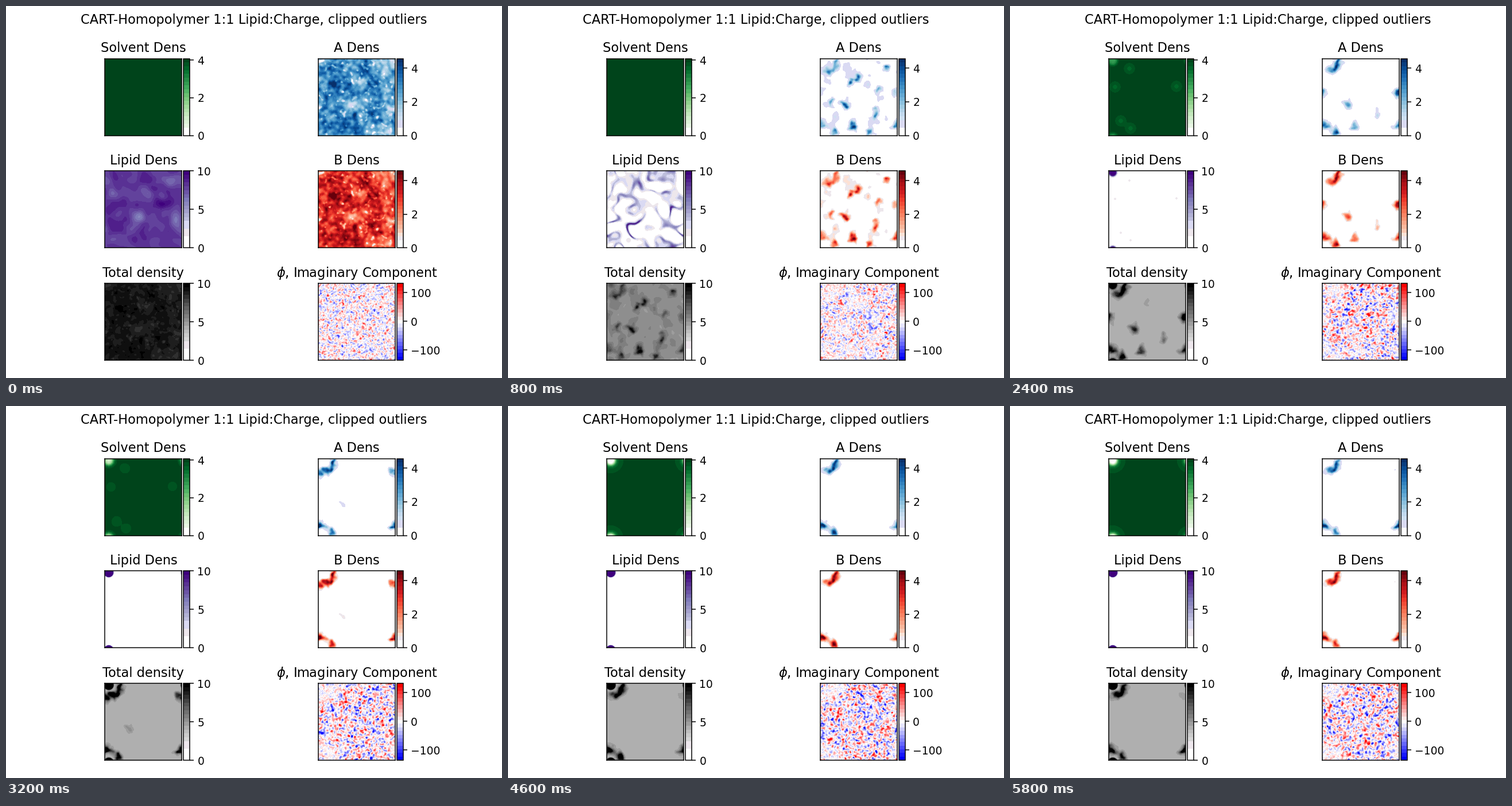
Recreate the animation shown at these times as a matplotlib script. Size 864 px wide and 648 px high, loop 6000 ms.

```python
import matplotlib.pyplot as plt
import numpy as np
from matplotlib.animation import FuncAnimation
from matplotlib.colors import ListedColormap

W, H, DPI = 864, 648, 135
SIZE = 134
FRAMES, INTERVAL = 30, 200

Y, X = np.mgrid[0:SIZE, 0:SIZE] + 0.5
FREQ = np.fft.fftfreq(SIZE)
FREQ2 = FREQ[:, None] ** 2 + FREQ[None, :] ** 2


def smooth(field, sigma):
    return np.fft.ifft2(np.fft.fft2(field) * np.exp(-2 * np.pi**2 * sigma**2 * FREQ2)).real


def noise(seed, sigma):
    """Periodic Gaussian noise with unit spread."""
    out = smooth(np.random.default_rng(seed).normal(size=(SIZE, SIZE)), sigma)
    return (out - out.mean()) / out.std()


def ramp(n, start, end):
    return np.clip((n - start) / (end - start), 0, 1)


def dist(x, y, warp=(0, 0)):
    """Distance to a point in the periodic box, optionally on a warped grid."""
    half = SIZE / 2
    dx = (X + warp[0] - x + half) % SIZE - half
    dy = (Y + warp[1] - y + half) % SIZE - half
    return np.hypot(dx, dy)


def blob(x, y, r, warp=(0, 0)):
    return np.exp(-((dist(x, y, warp) / r) ** 2))


def disk(x, y, r, soft):
    return 1 / (1 + np.exp(np.clip((dist(x, y) - r) / soft, -50, 50)))


CORE = (7, 4)
RING = 20.5
LOBES = np.radians([15, 45, 75, -38, -92, -117])
# Longest lived first
DROPS = [(42, 80), (59, 115), (95, 98), (66, 32), (53, 41), (117, 18), (84, 129), (103, 53), (18, 74)]
LIPID_SPOTS = [(21, 108), (11, 50), (118, 49), (38, 121), (36, 18)]
HOLES = [(14, 40), (74, 41), (116, 20), (124, 90), (60, 80)]

holes = sum(blob(x, y, 11) for x, y in HOLES)
specks = np.maximum(noise(3, 1.8) - 0.9, 0)
MIX = np.clip(2.95 + 0.45 * noise(1, 2.2) + 0.4 * noise(2, 6) - 1.3 * holes - 1.2 * specks, 0.4, 4.4)
LIPID_MIX = 8.2 + 0.35 * noise(4, 6) - 1.9 * holes + 1.1 * blob(100, 62, 10)
NETWORK = 0.9 + 5.5 * np.exp(-((noise(5, 7) / 0.5) ** 2)) * np.clip(0.65 + 0.35 * noise(8, 5), 0.1, 1.5)
SPOTS = sum(blob(x, y, 7.5) for x, y in LIPID_SPOTS)


def polymer(n, mix):
    """Polymer density: a dense mix that breaks into drops and a ring round the core."""
    warp = [2.4 * noise(30 + k, 4) + 0.8 * noise(200 + 2 * n + k, 2.5) for k in (0, 1)]
    out = np.zeros((SIZE, SIZE))

    radius = RING + 5 * np.exp(-n / 5)
    for i, angle in enumerate(LOBES):
        height = 2.2 + 1.3 * ramp(n, 2, 10) + 0.5 * np.sin(0.6 * n + 2 * i)
        x, y = CORE[0] + radius * np.cos(angle), CORE[1] + radius * np.sin(angle)
        out += height * blob(x, y, 6.8, warp)

    for i, (x, y) in enumerate(DROPS):
        life = 17 * 0.9**i
        if n < life:
            out += 4.3 * 0.95**i * (1 - (n / life) ** 3) * blob(x, y, 6.4, warp)

    # One cluster from the right edge slides up to the ring and dissolves
    height = 4.2 * ramp(n, 2, 8) * (1 - 0.9 * ramp(n, 14, 22))
    out += height * blob(132, 61 - 36 * ramp(n, 12, 16), 7, warp)

    out += 0.45 * (1 - ramp(n, 2, 9)) * np.maximum(noise(6, 4.5), 0)
    out *= 1 + 0.12 * noise(40 + n, 1.8)
    out *= 1 - ramp(n, 12, 16) * disk(*CORE, 11.5, 1.2)
    return mix * MIX + (1 - mix) * np.clip(out, 0, 4.5)


def fields(n):
    mix = (1 - ramp(n, 0, 4)) ** 2
    a = polymer(n, mix)
    b = a + 0.25 * mix + 0.06 * noise(80 + n, 2) * np.minimum(a, 1)

    grown = ramp(n, 8, 16)
    core = 13 * ramp(n, 2, 11) * disk(*CORE, 5 + 3.2 * grown, 1.8 - 1.3 * grown)
    spots = ramp(n, 3, 8) * (1 - 0.6 * ramp(n, 8, 12)) * (1 - ramp(n, 12, 17)) * 4 * SPOTS
    lipid = mix * LIPID_MIX + (1 - mix) * (1 - ramp(n, 4, 10)) * NETWORK + spots + core

    traces = ramp(n, 4, 8) * (1 - ramp(n, 14, 22))
    solvent = 4.07 - 0.45 * traces * np.sqrt(SPOTS) - 4 * ramp(n, 6, 18) ** 1.5 * disk(*CORE, 7.5, 1.8)
    solvent -= 0.45 * ramp(n, 14, 20) * blob(*CORE, 24)

    settled = ramp(n, 4, 12)
    total = 5.2 - 1.05 * ramp(n, 4, 8) + (0.55 + 0.35 * settled) * (a + b) + 0.8 * core
    total = total + 0.12 * (1 - settled) * noise(7, 4)
    total = mix * (9.1 + 0.4 * (MIX - 2.9)) + (1 - mix) * total

    # The field is strong in open solvent and fine grained inside the polymer
    clear = np.maximum(np.exp(-0.9 * np.maximum(smooth(a, 7), 0)), mix)
    coarse = noise(120 + n, 1.15 + 0.25 * ramp(n, 0, 12))
    coarse = np.sign(coarse) * np.abs(coarse) ** 1.2
    phi = (25 + 13 * ramp(n, 0, 6)) * clear * coarse + 12 * (1 - clear) * noise(160 + n, 0.6)
    return solvent, a, lipid, b, total, phi


def stepped(name, steps=20, white=0, tints=()):
    """Stepped colour map with a white foot and optional tinted steps above."""
    colors = plt.get_cmap(name)(np.linspace(0, 1, steps))
    colors[:white] = 1
    for i, tint in enumerate(tints, white):
        colors[i, :3] = tint
    return ListedColormap(colors)


PINK, LAVENDER, PEACH = (0.933, 0.906, 0.929), (0.855, 0.855, 0.953), (0.992, 0.886, 0.839)
PANELS = [
    ("Solvent Dens", stepped("Greens", white=2), 0, 4.08, [0, 2, 4]),
    ("A Dens", stepped("Blues", white=2, tints=[LAVENDER] * 2), 0, 4.57, [0, 2, 4]),
    ("Lipid Dens", stepped("Purples", white=3, tints=[PINK] * 2 + [LAVENDER] * 2), 0, 10, [0, 5, 10]),
    ("B Dens", stepped("Reds", white=2, tints=[PINK, PEACH]), 0, 4.58, [0, 2, 4]),
    ("Total density", stepped("Greys", white=3, tints=[PINK] * 2), 0, 10, [0, 5, 10]),
    (r"$\phi$, Imaginary Component", stepped("bwr", 21), -136, 132, [-100, 0, 100]),
]

fig = plt.figure(figsize=(W / DPI, H / DPI), dpi=DPI, facecolor="white")
fig.suptitle("CART-Homopolymer 1:1 Lipid:Charge, clipped outliers", fontsize=12)


def add_axes(x, y, w, h):
    return fig.add_axes([x / W, 1 - (y + h) / H, w / W, h / H])


images = []
for i, (title, cmap, low, high, ticks) in enumerate(PANELS):
    x, y = 172.4 + 371.8 * (i % 2), 91.6 + 195.8 * (i // 2)
    ax = add_axes(x, y, SIZE, SIZE)
    ax.set_title(title, fontsize=12)
    ax.set_xticks([])
    ax.set_yticks([])
    image = ax.imshow(np.zeros((SIZE, SIZE)), cmap=cmap, vmin=low, vmax=high, interpolation="nearest", aspect="auto")
    fig.colorbar(image, cax=add_axes(x + 136.7, y, 11.2, SIZE), ticks=ticks)
    images.append(image)


def update(n):
    for image, field in zip(images, fields(n)):
        image.set_data(field)
    return images


anim = FuncAnimation(fig, update, frames=FRAMES, interval=INTERVAL, repeat=True, repeat_delay=0, blit=False)
plt.show()
```
